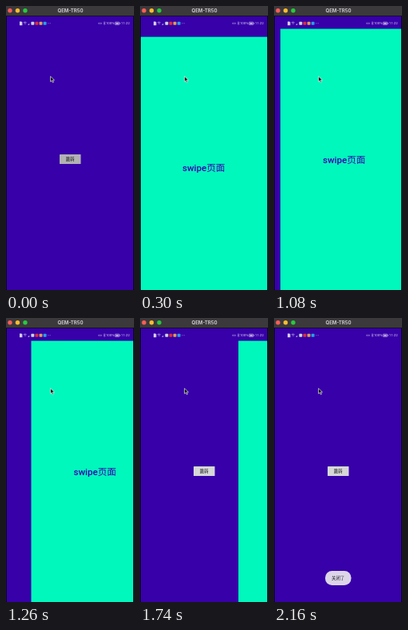
Write an HTML page that moves like this. It is 160 px wide and 356 px high and loops after 2220 ms.

```html
<!DOCTYPE html>
<html lang="zh-CN">
<head>
<meta charset="utf-8">
<title>Swipe page</title>
<style>
  html, body { margin: 0; width: 100%; height: 100%; overflow: hidden; background: #000; }
  svg { display: block; width: 160px; height: 356px; }
  text {
    font-family: Roboto, "Noto Sans CJK SC", "Noto Sans CJK", sans-serif;
    text-anchor: middle;
    dominant-baseline: central;
  }
</style>
</head>
<body>
<svg viewBox="0 0 160 356">
  <defs>
    <clipPath id="screen"><rect x="1" y="28" width="158" height="328"/></clipPath>
  </defs>

  <rect width="160" height="356" fill="#08051a"/>
  <rect x="1" y="13" width="158" height="343" fill="#3700a9"/>

  <g id="home">
    <rect id="button" x="67" y="186" width="26.5" height="12" rx=".6" fill="#d6d7d7"/>
    <text x="80.2" y="192.2" font-size="5.4" font-weight="500" fill="#161616">跳转</text>
  </g>

  <g clip-path="url(#screen)">
    <g id="page">
      <rect x="0" y="28.6" width="160" height="328" fill="#00f8bc"/>
      <text x="79.7" y="192.6" font-size="11.55" font-weight="500" fill="#3700b3">swipe页面</text>
    </g>
  </g>

  <g id="toast" opacity="0">
    <rect x="64" y="317" width="32.5" height="18" rx="8.5" fill="#dcd5e8"/>
    <text x="80.2" y="326" font-size="5.4" fill="#1c1a22">关闭了</text>
  </g>

  <g id="status" fill="#e8e2f6" opacity=".9">
    <path d="M17 19.4h2.4l1 1v3.8H17z"/>
    <path d="M22 20.8q1.8-1.5 3.6 0M22.8 22.2q1-.8 2 0M23.8 23.6v.1" fill="none" stroke="#e8e2f6" stroke-width=".7"/>
    <path d="M27.2 23.7l2-2v2z"/>
    <g id="apps"></g>
    <g id="dots"></g>
    <path d="M115.5 21.8h4M116.6 20.8l-1.1 1 1.1 1M118.4 20.8l1.1 1-1.1 1M122 20.6l2 2-1 1v-4l1 1-2 2" fill="none" stroke="#d8cff0" stroke-width=".5"/>
    <text x="130.2" y="21.9" font-size="4.4">100%</text>
    <rect x="136.2" y="20.1" width="5.6" height="3.4" rx=".8" fill="none" stroke="#e8e2f6" stroke-width=".6"/>
    <rect x="137.2" y="21" width="3.6" height="1.6"/>
    <rect x="142.2" y="21.1" width=".7" height="1.4"/>
    <text x="149.2" y="21.9" font-size="4.4">11:22</text>
  </g>

  <rect width="160" height="12" fill="#3b393c"/>
  <rect y="12" width="160" height="1" fill="#141217"/>
  <g id="lights"></g>
  <text x="80.5" y="5.7" font-size="6" font-weight="700" fill="#c9c7ca" style="font-family:Inter,sans-serif">QEM-TR50</text>

  <path d="M55.6 88.2v6.7l1.6-1.5 1.1 2.5 1.2-.5-1.1-2.5h2.1z" fill="#080808" stroke="#fff" stroke-width=".65" stroke-linejoin="round"/>
</svg>
<script>
  const LOOP = 2220, STEP = 60, HEIGHT = 328;
  const ENTER = { start: 60, length: 291 };
  // Time in ms and left edge of the dragged page.
  const DRAG = [[1020, 0], [1140, 16], [1260, 31.5], [1380, 44], [1500, 53],
                [1620, 74], [1740, 123], [1800, 142], [1860, 154], [1920, 161]];
  const $ = id => document.getElementById(id);
  const clamp = v => Math.min(1, Math.max(0, v));

  function add(parent, tag, attrs) {
    const el = document.createElementNS("http://www.w3.org/2000/svg", tag);
    for (const key in attrs) el.setAttribute(key, attrs[key]);
    $(parent).append(el);
  }

  ["#fb5f57", "#fdbc2e", "#29c840"].forEach((fill, i) =>
    add("lights", "circle", { cx: 5 + i * 9.5, cy: 5.7, r: 2.7, fill }));
  ["#d9eee0", "#ed3431", "#f4b04a", "#20b4ee"].forEach((fill, i) =>
    add("apps", "rect", { x: 31.4 + i * 5.1, y: 19.8, width: 3.9, height: 3.9, rx: .8, fill }));
  for (let i = 0; i < 3; i++)
    add("dots", "circle", { cx: 52.6 + i * 1.4, cy: 21.8, r: .4 });

  function track(points, t) {
    if (t <= points[0][0]) return points[0][1];
    for (let i = 1; i < points.length; i++) {
      const [t0, v0] = points[i - 1], [t1, v1] = points[i];
      if (t < t1) return v0 + (v1 - v0) * (t - t0) / (t1 - t0);
    }
    return points[points.length - 1][1];
  }

  function draw(t) {
    const rest = 1 - clamp((t - ENTER.start) / ENTER.length);
    const x = track(DRAG, t);
    const y = HEIGHT * rest * rest;
    $("page").setAttribute("transform", `translate(${x} ${y})`);
    $("button").setAttribute("fill", t < 600 ? "#b2b1b4" : "#d6d7d7");
    $("toast").setAttribute("opacity", clamp((t - 1860) / 180));
  }

  const begin = performance.now();
  function tick() {
    const t = (performance.now() - begin) % LOOP;
    draw(Math.floor(t / STEP) * STEP);
    requestAnimationFrame(tick);
  }
  tick();
</script>
</body>
</html>
```
